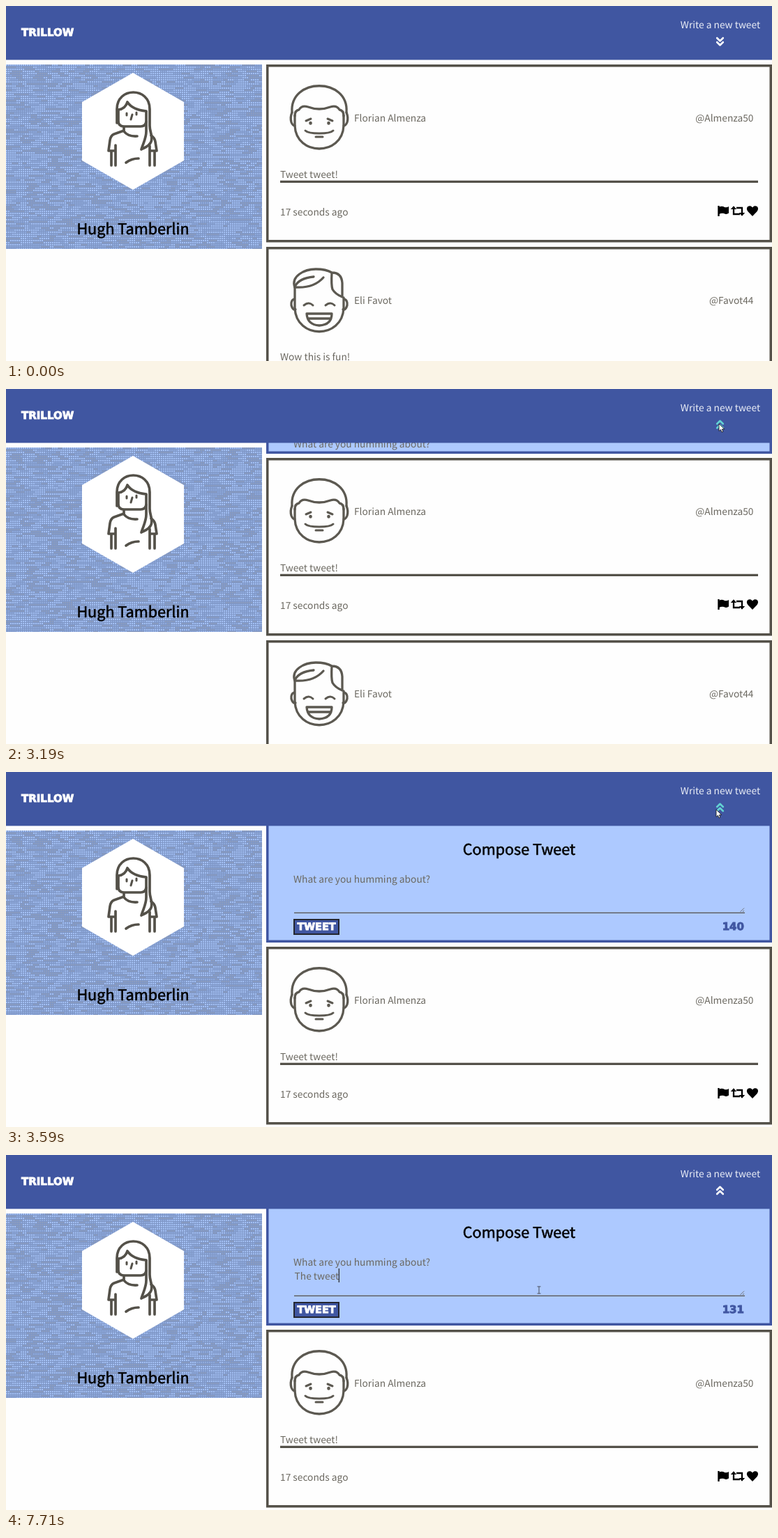
Write an HTML page with a canvas that moves like this. It is 1098 px wide and 510 px high and loops after 8 s.

```html
<!DOCTYPE html>
<html lang="en">
<head>
<meta charset="utf-8">
<title>Compose panel</title>
<style>
  html, body { margin: 0; width: 100%; height: 100%; overflow: hidden; background: #fefefe; }
  canvas, #stage { position: absolute; left: 0; display: block; }
  canvas { top: 84px; }
  #stage { top: 0; }
  text {
    font: 300 13.75px "Noto Sans CJK JP", "Noto Sans CJK SC", "Noto Sans CJK", "Noto Sans", sans-serif;
    fill: #6b6860; white-space: pre; text-rendering: geometricPrecision;
  }
  .head { font-size: 21.6px; font-weight: 400; fill: #000; stroke: #000; stroke-width: .55; }
  .chunky { font: 700 15px "DejaVu Sans", sans-serif; stroke-width: .9; }
  .white { fill: #fff; stroke: #fff; }
  .blue { fill: #4056a1; stroke: #4056a1; }
  .mid { text-anchor: middle; }
  .end { text-anchor: end; }
  .ink { fill: none; stroke: #545149; stroke-width: 3.7; stroke-linecap: round; stroke-linejoin: round; }
  .soft { stroke: #5c5951; stroke-width: 3.3; }
</style>
</head>
<body>
<canvas id="weave" width="367" height="265"></canvas>
<svg id="stage" width="1098" height="510" viewBox="0 0 1098 510">
  <path d="M182 96L255 138V222L182 264L109 222V138Z" fill="#fff"/>
  <g class="ink">
    <path d="M159 168V148C159 116 206 116 206 148V172C206 182 211 186 208 195C205 202 199 203 194 206C197 196 201 190 201 180V152"/>
    <path d="M161 149Q171 148 174 138Q181 149 201 151M161 149V165Q161 173 169 173H193Q200 173 201 166"/>
    <path d="M173 154V157M187 153V156M181 156L179 163" stroke-width="3"/>
    <path d="M169 174V179L155 184Q150 186 149 193L147 208H157M157 200V229M151 209V229"/>
    <path d="M169 180Q175 188 188 187M208 186Q213 189 214 195L216 208H206M206 201V229M213 209V229M172 225Q180 219 190 219"/>
  </g>
  <text class="head mid" x="182" y="328">Hugh Tamberlin</text>

  <g id="feed"></g>

  <svg id="panel" x="373" y="77" width="725" height="168">
    <rect width="725" height="168" fill="#adc9ff"/>
    <g id="form">
      <g transform="translate(-373 -77)">
        <text class="head mid" x="735.5" y="119">Compose Tweet</text>
        <text x="412" y="159">What are you humming about?</text>
        <text id="typed" x="413.6" y="179"></text>
        <rect id="caret" y="163" width="1.2" height="20" fill="#222"/>
        <path d="M413 202.4H1059" stroke="#545149" stroke-width="1.4"/>
        <path d="M1052.5 201L1058 195.5M1056 201L1058 199" stroke="#666" stroke-width=".9"/>
        <rect x="413" y="212" width="64" height="21" fill="#4056a1" stroke="#24262e" stroke-width="2"/>
        <text class="chunky white mid" x="445" y="227" style="font-size:14.4px">TWEET</text>
        <text id="count" class="chunky blue end" x="1058" y="227"></text>
      </g>
    </g>
    <path id="frame" fill="none" stroke="#4056a1" stroke-width="3.5"/>
  </svg>

  <rect width="1098" height="77.4" fill="#4056a1"/>
  <text class="chunky white" x="22" y="42.5">TRILLOW</text>
  <text class="mid" x="1024" y="31.5" style="fill:#e9edf6">Write a new tweet</text>
  <path id="arrows" fill="none" stroke-width="2.6" stroke-linecap="round" stroke-linejoin="round"
        d="M-4.3 -5L0 -.8L4.3 -5M-4.3 1L0 5.2L4.3 1"/>
  <path id="pointer" d="M0 0V10.4L2.5 8.3L4 12L5.9 11.2L4.4 7.7H7.8Z" fill="#fff" stroke="#111" stroke-width=".8"/>
  <path id="beam" d="M761.5 189H766.5M764 189V199M761.5 199H766.5" fill="none" stroke="#4a4f5c" stroke-width="1"/>
</svg>
<script>
const LOOP = 8000, FULL = 167, LIMIT = 140;
const $ = id => document.getElementById(id);

// time, pointer x, pointer y (no position: pointer is off the stage)
const MOVES = [
  [0], [270, 157, 411], [400], [670, 161, 241], [800, 473, 24], [930],
  [1330, 930, -11], [1460, 953, 5], [1600, 968, 15], [1730, 986, 27], [1860, 1003, 38],
  [2130, 1009, 42], [2260, 1016, 46], [2390, 1020, 49], [2520, 1022, 50], [3060, 1022, 50],
  [3190, 1022, 50], [3320, 1022, 50], [3470, 1022, 50], [3590, 1018, 54], [3720, 985, 73],
  [3850, 920, 108], [3980, 850, 145], [4110, 795, 172], [4240, 762, 187], [4370]
];

// time, typed text, caret shown
const KEYS = [
  [0, "", 0], [4630, "", 1], [5050, "T", 1], [5310, "The", 1], [5440, "The ", 1],
  [5840, "The t", 1], [6370, "The t", 0], [6640, "The tw", 1], [6770, "The twee", 1],
  [7300, "The twee", 0], [7710, "The tweet", 1]
];

const FACES = [
  `<path d="M410 153C406 102 492 102 488 153M414 157V172C416 216 482 216 484 172V157"/>
   <path d="M410 153Q407 160 409 167Q411 172 414 172M488 153Q491 160 489 167Q487 172 484 172"/>
   <path d="M414 158Q414 150 420 149Q424 142 433 145Q449 151 465 145Q474 142 478 149Q484 150 484 158"/>
   <path d="M430 165L437 162M468 165L461 162M429 179Q433 183 449 183Q465 183 469 179M444 188H454" stroke-width="3"/>
   <path d="M436.5 168V168.5M462.5 168V168.5" stroke-width="4.6"/>`,
  `<path d="M414 142V172C416 217 482 217 484 172V157"/>
   <path d="M413 159Q408 161 409 168Q411 175 415 174M485 159Q490 161 489 168Q487 175 483 174"/>
   <path d="M414 142C408 126 428 116 444 116Q459 116 467 121Q481 121 482 136V156Q472 152 468 145Q466 139 467 121"/>
   <path d="M414 142Q441 144 455 128M414 141Q420 129 441 127"/>
   <path d="M427 168Q434 162 440 168M458 168Q465 162 471 168" stroke-width="3"/>
   <path d="M431 180H467Q467 196 449 197Q432 196 431 180ZM433 187H465"/>`
];

const ICONS = `
  <path d="M1021.5 287V302" stroke="#000" stroke-width="2.4"/>
  <path d="M1022 289Q1026 286.5 1030 289Q1033 290 1036 288V297.5Q1033 300 1029 298Q1026 297 1022 299Z"/>
  <path d="M1043 291V299H1052M1047 290H1055V298" fill="none" stroke="#000" stroke-width="2.3"/>
  <path d="M1038.8 292L1043 287.2L1047.2 292ZM1050.8 297L1055 301.8L1059.2 297Z"/>
  <path d="M1070 302L1063.3 295C1059 289 1066 284.5 1070 289.5C1074 284.5 1081 289 1076.7 295Z"/>`;

const card = (name, handle, words, face, i) => `
  <g transform="translate(0 ${i * 262})">
    <rect x="374.75" y="85.75" width="721.5" height="252" fill="#fefefe" stroke="#545149" stroke-width="3.5"/>
    <g class="ink soft">${face}</g>
    <text x="499" y="165.5">${name}</text>
    <text class="end" x="1071.5" y="165.5">${handle}</text>
    <text x="393" y="246.5">${words}</text>
    <path d="M393 252.3H1078" stroke="#545149" stroke-width="3.2"/>
    <text x="393" y="300.5">17 seconds ago</text>
    ${ICONS}
  </g>`;

$("feed").innerHTML =
  card("Florian Almenza", "@Almenza50", "Tweet tweet!", FACES[0], 0) +
  card("Eli Favot", "@Favot44", "Wow this is fun!", FACES[1], 1);

// woven backdrop: rows of short dashes in a few blues
function weave() {
  const g = $("weave").getContext("2d");
  let seed = 11;
  const rnd = () => (seed = seed * 16807 % 2147483647) / 2147483647;
  g.fillStyle = "#7e96c6";
  g.fillRect(0, 0, 367, 265);
  for (let y = 0; y < 265; y += 3) {
    let tone = "", left = 0;
    for (let x = 0; x < 367; x += 3) {
      if (left-- <= 0) {
        left = rnd() * 4;
        tone = rnd() < .5 ? "#a4c1f5" : rnd() < .5 ? "#8faadc" : "#8c9dbf";
      }
      g.fillStyle = tone;
      g.fillRect(x, y, 2, 2);
    }
  }
}

const at = (table, t) => table.findLast(row => row[0] <= t);
const show = (el, on) => el.setAttribute("visibility", on ? "visible" : "hidden");
const move = (el, x, y, more = "") => el.setAttribute("transform", `translate(${x} ${y}) ${more}`);

function slide(t) {
  const k = Math.min(1, Math.max(0, (t - 3113) / 400));
  return .5 - Math.cos(Math.PI * k) / 2;
}

function draw(t) {
  const [time, x, y] = at(MOVES, t);
  const p = slide(time), open = p > 0, shift = Math.round(FULL * p), h = shift + 1;

  move($("feed"), 0, shift);
  $("panel").setAttribute("height", h);
  $("panel").style.display = open ? "" : "none";
  move($("form"), 0, Math.round(-82 * (1 - p)));
  $("frame").setAttribute("d", `M1.75 -9V${h - 1.75}H723.25V-9`);

  const hover = time >= 2390 && time < 3720;
  $("arrows").setAttribute("stroke", !hover ? "#fff" : open ? "#62d2d3" : "#68ebc6");
  move($("arrows"), 1023.5, 51, `scale(${hover && !open ? 1.3 : 1} ${open ? -1 : hover ? 1.3 : 1})`);

  show($("pointer"), x !== undefined);
  if (x !== undefined) move($("pointer"), x, y);
  show($("beam"), t >= 4370);

  const [, words, caret] = at(KEYS, t);
  $("typed").textContent = words;
  $("count").textContent = LIMIT - words.length;
  show($("caret"), caret);
  $("caret").setAttribute("x", 413 + (words ? $("typed").getComputedTextLength() : 0));
}

weave();
const start = performance.now();
function tick() {
  draw((performance.now() - start) % LOOP);
  requestAnimationFrame(tick);
}
tick();
</script>
</body>
</html>
```
